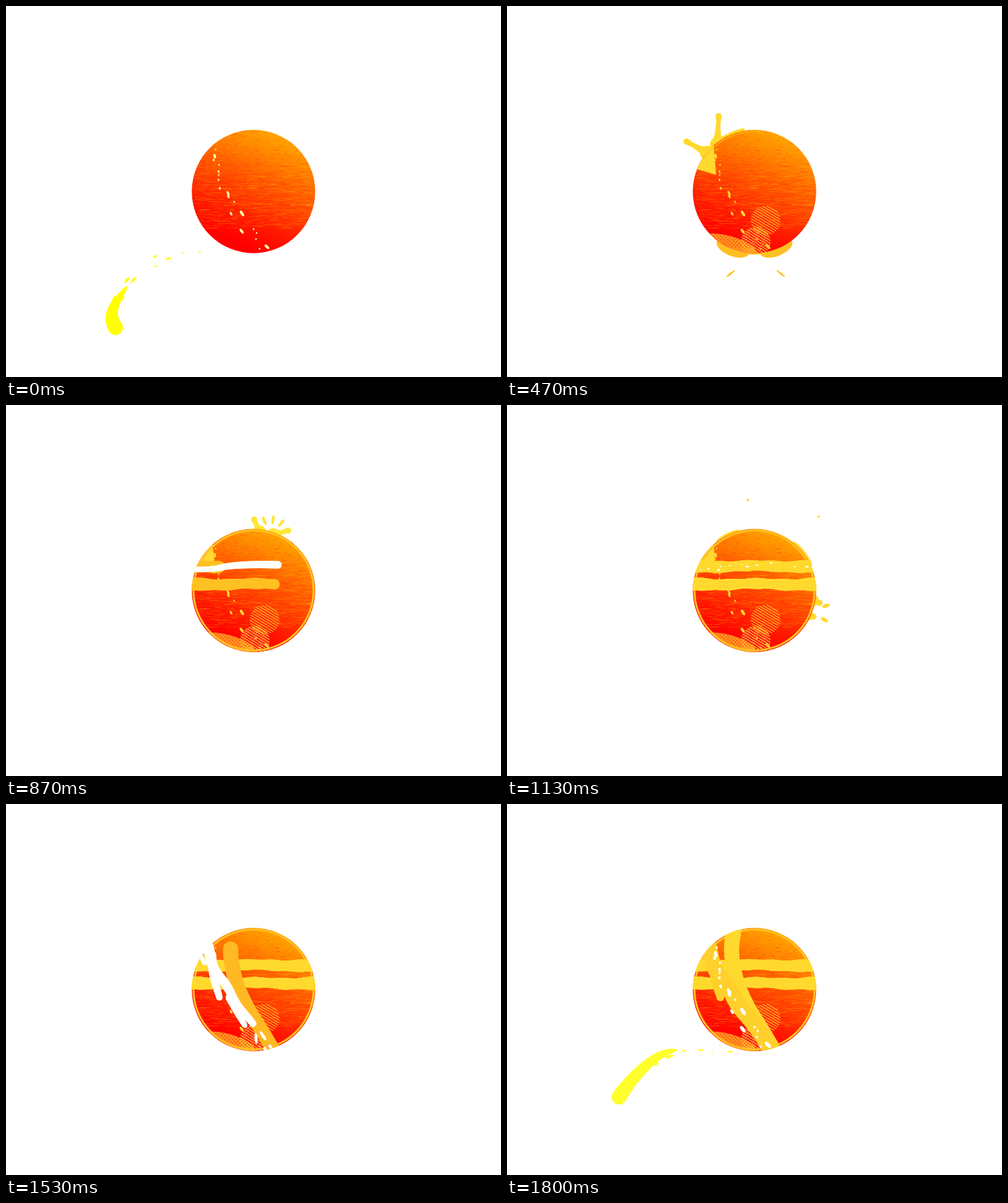
Recreate the animation shown at these times as an HTML page with a canvas. Size 800 by 600 pixels, loop 1.87 s.

```html
<!DOCTYPE html>
<html lang="en">
<head>
<meta charset="utf-8">
<title>Sun and paint</title>
<style>
html, body { margin: 0; width: 100%; height: 100%; overflow: hidden; background: #fff; }
canvas { display: block; }
</style>
</head>
<body>
<canvas id="c" width="800" height="600"></canvas>
<script>
const ctx = document.getElementById('c').getContext('2d');
const LOOP = 1870, STEPS = 28, TAU = Math.PI * 2, DEG = Math.PI / 180;
const GOLD = '#ffd92e', AMBER = '#ffc022', PALE = '#ffff88', WHITE = '#fff';
const lerp = (a, b, u) => a + (b - a) * u;
const clamp = (v, a = 0, b = 1) => Math.min(b, Math.max(a, v));
// Rises to 1 at the peak step and falls back to 0
const pulse = (k, peak, width) => Math.max(0, 1 - ((k - peak) / width) ** 2);

function rng(seed) {
  return () => (seed = (seed * 16807) % 2147483647) / 2147483647;
}

// Catmull-Rom position; u counts points
function spline(pts, u) {
  const n = pts.length - 1, i = clamp(Math.floor(u), 0, n - 1), t = clamp(u - i);
  const p = j => pts[clamp(j, 0, n)];
  return [0, 1].map(d => {
    const a = p(i - 1)[d], b = p(i)[d], c = p(i + 1)[d], e = p(i + 2)[d];
    return b + t / 2 * (c - a + t * (2 * a - 5 * b + 4 * c - e + t * (3 * (b - c) + e - a)));
  });
}

function heading(pts, u) {
  const [x0, y0] = spline(pts, u - 0.05), [x1, y1] = spline(pts, u + 0.05);
  return Math.atan2(y1 - y0, x1 - x0);
}

function oval(x, y, rx, ry, angle, color) {
  ctx.fillStyle = color;
  ctx.beginPath();
  ctx.ellipse(x, y, Math.max(0, rx), Math.max(0, ry), angle, 0, TAU);
  ctx.fill();
}
const disc = (x, y, r, color) => oval(x, y, r, r, 0, color);

// Round stamps along a spline; radius(u) for u from 0 to end
function brush(pts, radius, color, end = 1, start = 0) {
  for (let i = 0; i <= 80; i++) {
    const u = lerp(start, end, i / 80);
    disc(...spline(pts, u * (pts.length - 1)), radius(u), color);
  }
}

// Seeded flecks of paint along a spline
function scatter(pts, count, spread, size, seed) {
  const r = rng(seed);
  return Array.from({ length: count }, (_, i) => {
    const u = (i + r()) / count * (pts.length - 1), [x, y] = spline(pts, u);
    const a = heading(pts, u), off = (r() - 0.5) * 2 * spread, len = size * (0.3 + r() ** 2);
    return { u, a, x: x - Math.sin(a) * off, y: y + Math.cos(a) * off, len, w: 1 + len * 0.25 };
  });
}
function flecks(list, color, scale) {
  list.forEach(f => {
    const s = typeof scale === 'function' ? scale(f) : scale;
    oval(f.x, f.y, f.len * s, f.w * s, f.a, color);
  });
}

// Flying drops, fanned around a centre
function fan(x, y, from, to, count, dist, len, w, color) {
  for (let i = 0; i < count; i++) {
    const a = lerp(from, to, i / (count - 1)) * DEG;
    oval(x + Math.cos(a) * dist, y + Math.sin(a) * dist, len / 2, w / 2, a, color);
  }
}

// Splash arm with a wide foot and a round tip
function jet(x0, y0, x1, y1, foot, s, color) {
  if (s <= 0) return;
  const tip = [lerp(x0, x1, s), lerp(y0, y1, s)];
  brush([[x0, y0], tip], u => 2.8 + foot * (1 - u) ** 3 + 2 * u ** 4, color);
}

// Bulge lying along the rim of the ball
function bump(deg, len, height, color) {
  const a = deg * DEG;
  if (height > 0) oval(400 + 97 * Math.cos(a), 300 + 97 * Math.sin(a), height, len / 2, a, color);
}

function inClip(path, draw) {
  ctx.save();
  ctx.beginPath();
  path();
  ctx.clip();
  draw();
  ctx.restore();
}

const ball = document.createElement('canvas');
ball.width = 800;
ball.height = 600;
(function paintBall(c) {
  c.arc(400, 300, 99.7, 0, TAU);
  c.clip();
  const g = c.createLinearGradient(440, 202, 366, 380);
  ['#ffaa00', '#ff8800', '#ff6000', '#ff3c00', '#ff1800', '#ff0000']
    .forEach((col, i) => g.addColorStop(i / 5, col));
  c.fillStyle = g;
  c.fillRect(300, 200, 200, 200);
  const r = rng(77);
  for (let i = 0; i < 1800; i++) {
    const y = 200 + Math.floor(r() * 160), top = y < 255;
    c.fillStyle = r() < 0.5 ? 'rgba(255,190,0,.2)' : 'rgba(255,40,0,.2)';
    c.fillRect(300 + r() * 200, y, (top ? 2 : 4) + r() * (top ? 5 : 16), 1);
  }
})(ball.getContext('2d'));

// Paths of the paint: one point per step outside the ball
const lowLoop = [[420, 385], [340, 395], [250, 405], [181, 474], [177, 520],
  [230, 547], [318, 533], [383, 466], [412, 395], [420, 345]];
const leftLoop = [[330, 240], [240, 205], [150, 215], [112, 270], [180, 292], [300, 270]];
const rightLoop = [[480, 262], [532, 268], [530, 305], [490, 325]];
const sweep = [[300, 266], [335, 265], [365, 260], [420, 258], [500, 261]];
const rise = [[430, 394], [412, 364], [388, 325], [371, 285], [363, 240], [367, 200]];
const fall = [[327, 232], [336, 266], [356, 293], [374, 325], [399, 355], [426, 393]];

const lowFlecks = scatter(lowLoop, 42, 9, 9, 21);
const spots = scatter([[331, 234], [340, 270], [358, 312], [390, 362], [420, 392]], 19, 9, 4.5, 8);
const sweepFlecks = scatter(sweep, 12, 3, 6, 5);

function trail(pts, pos, r, color) {
  const span = 1.3;
  for (let age = 0; age < span; age += 0.015) {
    const u = pos - age;
    if (u >= 0 && u <= pts.length - 1) disc(...spline(pts, u), r * Math.sqrt(1 - age / span), color);
  }
}

function outer(k) {
  const low = (k + 4) % STEPS;
  if (low >= 1 && low <= 11) {
    const color = `rgb(255,255,${Math.round(clamp(Math.abs(low - 4) / 3) * 136)})`;
    trail(lowLoop, low, 12, color);
    flecks(lowFlecks, color, f => {
      const age = low - f.u;
      return age > 0.8 ? 1 - age / 3.8 : 0;
    });
  }
  if (k >= 8 && k <= 12) trail(leftLoop, k - 7, 9, PALE);
  if (k >= 14 && k <= 16) trail(rightLoop, k - 13.5, 8, '#ffee55');
}

function splashes(k) {
  const low = pulse(k, 7, 3), left = pulse(k, 7, 3), top = pulse(k, 13, 2.5), right = pulse(k, 17, 3);
  if (low) {
    bump(111, 56, 14 * low, AMBER);
    bump(69, 56, 14 * low, AMBER);
    bump(90, 50, 5 * low, AMBER);
    fan(402, 400, 39, 141, 2, 52 + (k - 7) * 8, 18 * low, 3 * low, AMBER);
  }
  if (left) {
    jet(340, 224, 342, 178, 9, left, GOLD);
    jet(324, 238, 290, 219, 9, left, GOLD);
    bump(-117, 64, 6 * left, GOLD);
  }
  if (top) {
    jet(410, 206, 401, 185, 8, top, '#ffe63c');
    jet(432, 210, 456, 203, 8, top, '#ffe63c');
    fan(428, 212, -113, -51, 3, 27 + (k - 13) * 8, 15 * top, 5 * top, '#ffe63c');
  }
  if (k >= 14 && k <= 17) fan(435, 217, -126, -28, 2, 78 - (17 - k) * 14, 5, 3, GOLD);
  if (right) {
    bump(-116, 42, 6 * right, GOLD);
    bump(-37, 50, 6 * right, GOLD);
    jet(494, 316, 505, 320, 7, right, GOLD);
    jet(488, 341, 495, 342, 4, right, GOLD);
    fan(490, 333, -18, 32, 2, 27 + (k - 17) * 6, 13 * right, 6 * right, GOLD);
  }
  const exit = pulse(k, 21, 2);
  if (exit) fan(432, 390, 55, 115, 2, 16 + (k - 20) * 9, 9 * exit, 4 * exit, GOLD);
}

function hatch(x, y, size, slope) {
  ctx.strokeStyle = '#ffb82b';
  ctx.lineWidth = 1.3;
  ctx.beginPath();
  for (let d = -2 * size; d < 2 * size; d += 4.5) {
    ctx.moveTo(x - size, y + d - size * slope);
    ctx.lineTo(x + size, y + d + size * slope);
  }
  ctx.stroke();
}

function dots(x0, y0, x1, y1, step, color) {
  ctx.fillStyle = color;
  for (let y = y0, row = 0; y < y1; y += step, row++)
    for (let x = x0 + (row % 2) * step; x < x1; x += step * 2) ctx.fillRect(x, y, 2, 1.5);
}

function patches(k) {
  inClip(() => ctx.arc(402, 381, 24, 0, TAU), () => {
    dots(376, 356, 428, 402, 2.5, '#ff7766');
    hatch(402, 381, 26, 0.6);
  });
  if (k > 4) inClip(() => ctx.arc(418, 347, 24, 0, TAU), () => hatch(418, 347, 26, 0.6));
  if (k > 5) inClip(() => ctx.ellipse(350, 393, 56, 23, 12 * DEG, 0, TAU), () => {
    ctx.fillStyle = 'rgba(255,190,40,.75)';
    ctx.fillRect(290, 340, 130, 70);
    dots(290, 365, 405, 390, 3, '#ff4a10');
  });
}

// Wavy horizontal stripe, thicker near the rim
function band(y, tip, color) {
  for (let x = 290; x < tip - 8; x++) {
    const edge = ((x - 400) / 100) ** 2;
    disc(x, y + edge + Math.sin(x / 17), 8.4 + 2 * edge + 0.6 * Math.sin(x / 7 + y), color);
  }
}

function bands(k) {
  const i = k - 12, color = k < 15 ? AMBER : GOLD;
  band(260.5, [325, 354, 440][i] || 520, color);
  band(289.5, [340, 443, 500][i] || 520, color);
  if (i < 4) brush(sweep, u => 4 + 3 * u, WHITE, clamp(0.25 + 0.56 * i), clamp((i - 1) * 0.35));
  else if (i < 7) flecks(sweepFlecks, WHITE, 1 - (i - 4) * 0.3);
}

function crossing(k) {
  brush(rise, u => 11 + 1.5 * u, k < 24 ? '#ffb922' : GOLD, clamp((k - 20) * 0.275));
  const finger = [[332, 245], [336, 280], [345, 313]];
  if (k >= 24) {
    brush(fall, u => 12 + 2 * u, '#ffd02c');
    brush(finger, u => 9 - 3 * u, '#ffd02c');
  }
  if (k >= 22 && k <= 24) {
    brush(fall, u => 9 - 4 * u, WHITE, clamp((k - 21) * 0.4));
    if (k > 22) {
      brush(finger, u => 8 - 3 * u, WHITE);
      brush([[362, 313], [374, 337], [386, 358]], u => 7 - 3 * u, WHITE);
      brush([[315, 246], [321, 258]], () => 3, WHITE);
      fan(402, 355, 56, 85, 2, 24, 18, 5, WHITE);
      fan(402, 355, 56, 68, 2, 45, 8, 5, WHITE);
    }
  }
  if (k > 24) flecks(spots, WHITE, 1.35);
}

function inside(k) {
  flecks(spots, k === 0 ? '#fff9a0' : GOLD, 1);
  if (k < 4) return;
  patches(k);
  if (k >= 6) {
    ctx.fillStyle = GOLD;
    ctx.beginPath();
    [[300, 262], [334, 224], [338, 273]].forEach(p => ctx.lineTo(...p));
    ctx.fill();
  }
  if (k >= 7) {
    const full = k >= 12;
    ctx.strokeStyle = AMBER;
    ctx.lineWidth = full ? 3 : 1.2;
    ctx.beginPath();
    ctx.arc(400, 300, 97, full ? 0 : 3.7, full ? TAU : 4.8);
    ctx.stroke();
  }
  if (k >= 12) bands(k);
  if (k >= 21) crossing(k);
}

function draw(k) {
  ctx.fillStyle = WHITE;
  ctx.fillRect(0, 0, 800, 600);
  outer(k);
  splashes(k);
  ctx.drawImage(ball, 0, 0);
  inClip(() => ctx.arc(400, 300, 99.6, 0, TAU), () => inside(k));
}

// Steps begin on multiples of 10 ms
const starts = Array.from({ length: STEPS }, (_, i) => Math.round(i * 20 / 3) * 10);
const t0 = performance.now();
function tick() {
  const t = (performance.now() - t0) % LOOP;
  let k = STEPS - 1;
  while (k > 0 && starts[k] > t) k--;
  draw(k);
  requestAnimationFrame(tick);
}
tick();
</script>
</body>
</html>
```
